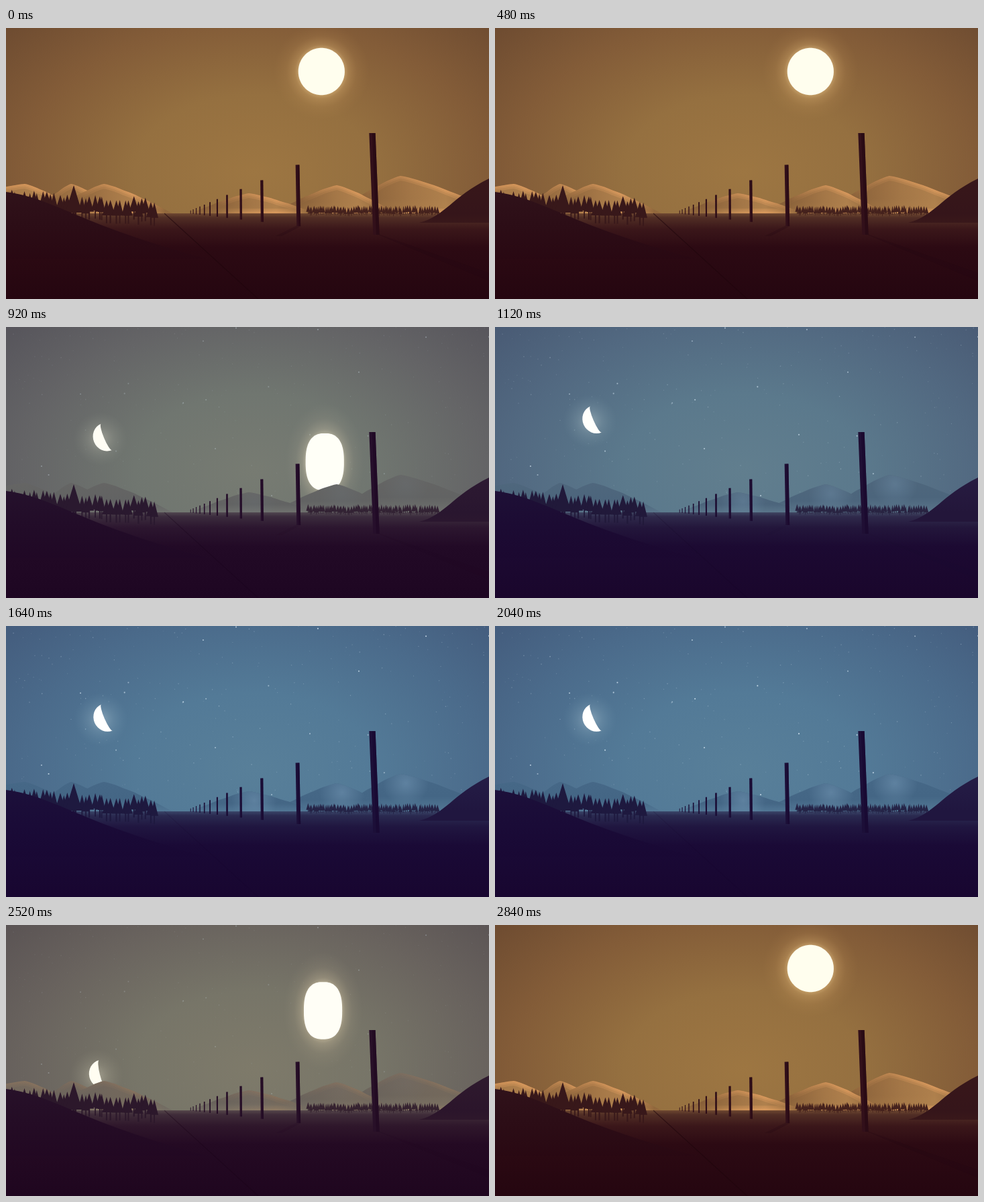
An HTML page with a canvas that plays this animation: 720x405 px, repeating every 3.24 s.

```html
<!DOCTYPE html>
<html lang="en">
<head>
<meta charset="utf-8">
<title>Day and night</title>
<style>
  html, body { margin: 0; width: 100%; height: 100%; overflow: hidden; background: #270610; }
  canvas { display: block; width: 100vw; height: 100vh; }
</style>
</head>
<body>
<canvas id="stage" width="720" height="405"></canvas>
<script>
const ctx = document.getElementById('stage').getContext('2d');
const W = 720, H = 405, HORIZON = 277, LOOP = 3240, STEP = 40, REST = 2840;

const clamp = v => Math.min(1, Math.max(0, v));
const smooth = v => { v = clamp(v); return v * v * (3 - 2 * v); };
const range = (n, make) => Array.from({ length: n }, (_, i) => make(i));

function seeded(seed) {
  return () => (seed = (seed * 16807) % 2147483647) / 2147483647;
}
const rand = seeded(4711);

// Every colour is a day/night pair blended by `night`.
let night = 0;
const channels = hex => [1, 3, 5].map(i => parseInt(hex.slice(i, i + 2), 16));
function tone(day, dark, alpha = 1) {
  const b = channels(dark);
  const rgb = channels(day).map((v, i) => Math.round(v + (b[i] - v) * night));
  return `rgba(${rgb},${alpha})`;
}
function withStops(gradient, stops) {
  for (const [at, day, dark, alpha] of stops) gradient.addColorStop(at, tone(day, dark, alpha));
  return gradient;
}
const vertical = (y0, y1, stops) => withStops(ctx.createLinearGradient(0, y0, 0, y1), stops);
const horizontal = (x0, x1, stops) => withStops(ctx.createLinearGradient(x0, 0, x1, 0), stops);
const radial = (x, y, r, stops) => withStops(ctx.createRadialGradient(x, y, 0, x, y, r), stops);

function polygon(points) {
  ctx.beginPath();
  points.forEach(([x, y]) => ctx.lineTo(x, y));
  ctx.fill();
}
function disc(x, y, r) {
  ctx.beginPath();
  ctx.arc(x, y, r, 0, 7);
  ctx.fill();
}

// Scene
const peaks = [
  { x: 588, y: 221, left: 490, right: 738 },
  { x: 493, y: 235, left: 397, right: 582 },
  { x: 362, y: 247, left: 276, right: 462 },
  { x: 28, y: 233, left: -150, right: 118 },
  { x: 97, y: 233, left: 40, right: 178 },
  { x: 146, y: 233, left: 62, right: 248 }
];
const poles = range(12, i => {
  const x = 230 + 316 / (1 + 0.545 * i), near = (x - 265) / 281;
  return { x, top: HORIZON - 120 * near, base: 276.3 + 32.7 * near, half: 0.25 + 4.4 * near, lean: 6 * near ** 2.5 };
});
const farTrees = range(66, i => {
  const top = 264.5 + rand() * 4;
  return { x: 449 + i * 2.96 + rand() * 2, top, half: 2 + rand() * 1.4, base: top + 10, trunk: 4 };
});
const nearTrees = range(34, i => {
  const x = 6 + i * 6.5 + rand() * 4, top = 240 + x * 0.058 + rand() * 9;
  return { x, top, half: 5.5 + rand() * 2.5, base: top + 23, trunk: 13 };
});
nearTrees.push({ x: 101, top: 235, half: 12.5, base: 276, trunk: 8 });

const stars = range(260, i => {
  const bright = i < 22;
  return {
    x: rand() * W, y: rand() ** 1.25 * 255, phase: rand() * 6,
    r: bright ? 1.05 : 0.45 + rand() * 0.4,
    glow: bright ? 0.8 : 0.12 + rand() * 0.28
  };
});

// Motion
const nightAt = t => smooth((t - 480) / 820) - smooth((t - 2160) / 680);

function sunAt(t) {
  const setting = t < 1600;
  const drop = setting
    ? 6 * Math.max(0, (t - 611) / 109) ** 3
    : 185 * Math.max(0, (2800 - t) / 480) ** 2;
  const squeeze = setting ? clamp((t - 600) / 240) : clamp((2760 - t) / 220);
  const stretch = setting ? squeeze : squeeze * clamp((t - 2300) / 150);
  return { x: 470.3 + drop * 0.036, y: 65 + drop, rx: 34.6 - 6 * squeeze, ry: 35.3 + 7.5 * stretch, stretch };
}
function moonDrop(t) {
  return t < 1600
    ? 88 * Math.max(0, (1175 - t) / 455) ** 2
    : 6 * Math.max(0, (t - 2180) / 140) ** 3;
}

// Drawing
function drawSky() {
  ctx.save();
  ctx.translate(370, 215);
  ctx.scale(1.55, 1);
  ctx.fillStyle = radial(0, 0, 330, [
    [0, '#9d7642', '#587f99'], [0.35, '#957040', '#537a97'],
    [0.68, '#835c38', '#4b6b8b'], [1, '#6c4a30', '#435b7c']
  ]);
  ctx.fillRect(-W, -H, 2 * W, 2 * H);
  ctx.restore();
}

function drawStars(t) {
  ctx.fillStyle = '#dcecf8';
  for (const s of stars) {
    ctx.globalAlpha = night ** 1.3 * s.glow * (0.82 + 0.18 * Math.sin(t / 130 + s.phase));
    disc(s.x, s.y, s.r);
  }
  ctx.globalAlpha = 1;
}

// A disc whose sides flatten as it is stretched
function drawSun(t) {
  const { x, y, rx, ry, stretch } = sunAt(t);
  if (y > 330) return;
  ctx.save();
  ctx.translate(x, y);
  ctx.scale(rx / 35, ry / 35);
  ctx.fillStyle = radial(0, 0, 72, [
    [0.45, '#f3cf92', '#dfe9e6', 0.6], [0.56, '#e0b474', '#c4d4d6', 0.32],
    [0.74, '#d0a062', '#a9c0c8', 0.12], [1, '#b88a50', '#8fb0c0', 0]
  ]);
  disc(0, 0, 72);
  const bend = 2 / (2 + 0.55 * stretch);
  const round = v => Math.sign(v) * Math.abs(v) ** bend * 35;
  ctx.fillStyle = tone('#fffeee', '#ffffff');
  polygon(range(120, i => [round(Math.cos(i * Math.PI / 60)), round(Math.sin(i * Math.PI / 60))]));
  ctx.restore();
}

function drawMoon(t) {
  const drop = moonDrop(t);
  if (drop > 140) return;
  const low = (drop / 88) ** 2;
  ctx.save();
  ctx.translate(150.5 - 7 * low, 136.7 + drop);
  ctx.fillStyle = radial(-9, 3, 40, [
    [0, '#ffe9b8', '#dcecef', 0.4], [0.45, '#e8c890', '#b4d0dc', 0.18], [1, '#c09a60', '#7ea6bc', 0]
  ]);
  disc(-9, 3, 40);
  ctx.rotate((10 * low - 23.5) * Math.PI / 180);
  ctx.fillStyle = tone('#fffbe6', '#ffffff');
  ctx.beginPath();
  ctx.ellipse(0, 0, 20, 21.3, 0, -Math.PI / 2, Math.PI / 2, true);
  ctx.ellipse(0, 0, 4, 21.3, 0, Math.PI / 2, Math.PI * 1.5);
  ctx.fill();
  ctx.restore();
}

function peakPath({ x, y, left, right }) {
  ctx.beginPath();
  for (let i = -24; i <= 24; i++) {
    const u = Math.abs(i) / 24, foot = i < 0 ? left : right;
    const wobble = Math.sin(i * 0.9 + x) * 1.1 * u * (1 - u);
    ctx.lineTo(x + (foot - x) * u, y + (HORIZON - y) * u ** 1.25 + wobble);
  }
  ctx.closePath();
}

function drawPeak(peak) {
  const { x, y, left, right } = peak;
  const lit = clamp(1 - 1.8 * night), silver = night ** 3;
  const light = (color, alpha) => horizontal(x - (x - left) * 0.6, x + (right - x) * 0.9, [
    [0, color, color, 0], [0.4, color, color, alpha * 0.7], [0.65, color, color, alpha], [1, color, color, 0]
  ]);
  ctx.save();
  peakPath(peak);
  ctx.fillStyle = vertical(y, HORIZON, [[0, '#8b6139', '#466887'], [0.6, '#886039', '#446685'], [1, '#93693d', '#527795']]);
  ctx.fill();
  ctx.clip();
  ctx.fillStyle = light('#c8955a', lit * 0.6);
  ctx.fill();
  ctx.strokeStyle = light('#eda564', lit * 0.3);
  for (const width of [3, 8, 14]) {
    ctx.lineWidth = width;
    ctx.stroke();
  }
  ctx.fillStyle = radial(x + 8, y + 14, 34, [[0, '#8db2cf', '#8db2cf', silver * 0.35], [1, '#8db2cf', '#8db2cf', 0]]);
  if (x > W / 2) ctx.fill();
  ctx.restore();
}

function drawGround() {
  ctx.fillStyle = vertical(HORIZON, H, [
    [0, '#6e4831', '#3a4669'], [0.05, '#512e25', '#2a2a50'], [0.18, '#3b171a', '#201640'],
    [0.4, '#2c0a13', '#1a0a36'], [1, '#250610', '#180630']
  ]);
  ctx.fillRect(0, HORIZON, W, H - HORIZON);

  const day = 1 - night;
  ctx.strokeStyle = tone('#1e050d', '#150528', 0.15 + 0.45 * day);
  ctx.lineWidth = 1.2;
  ctx.beginPath();
  ctx.moveTo(236, 277);
  ctx.lineTo(376, 405);
  ctx.stroke();

  ctx.fillStyle = tone('#230510', '#180630', 0.25 * day);
  polygon([[434, 295], [440, 296], [411, 311], [402, 311]]);
  polygon([[550, 307], [558, 309], [720, 366], [720, 378]]);
}

function drawTree({ x, top, half, base, trunk }) {
  polygon([[x, top], [x + half, base], [x - half, base]]);
  ctx.fillRect(x - half * 0.15, base - 1, Math.max(0.9, half * 0.3), trunk);
}

function drawHills() {
  ctx.fillStyle = vertical(225, 291, [[0, '#38171a', '#251d46'], [0.8, '#35151a', '#20163f'], [1, '#39181a', '#20163f']]);
  ctx.beginPath();
  ctx.moveTo(616, 291);
  ctx.bezierCurveTo(655, 281, 665, 252, W, 225);
  ctx.lineTo(W, 291);
  ctx.fill();

  ctx.fillStyle = vertical(245, 350, [[0, '#30121a', '#1c103a'], [0.5, '#2c0d16', '#1a0b37'], [1, '#290812', '#190834']]);
  ctx.beginPath();
  ctx.moveTo(0, 245);
  ctx.bezierCurveTo(75, 255, 105, 293, 300, 345);
  ctx.lineTo(0, 345);
  ctx.fill();
}

function drawPoles() {
  for (const { x, top, base, half, lean } of poles) {
    ctx.fillStyle = tone('#32101a', '#1c0f38');
    polygon([[x - half, top], [x + half, top], [x + half + lean, base], [x - half + lean, base]]);
    ctx.fillStyle = tone('#260812', '#170730', 0.55);
    polygon([[x, top], [x + half, top], [x + half + lean, base], [x + lean, base]]);
  }
}

function draw(t) {
  night = nightAt(t);
  drawSky();
  drawStars(t);
  drawSun(t);
  drawMoon(t);
  peaks.forEach(drawPeak);
  drawGround();
  ctx.fillStyle = tone('#45221d', '#252447');
  farTrees.forEach(drawTree);
  ctx.fillStyle = tone('#38181a', '#1e193f');
  nearTrees.forEach(drawTree);
  drawHills();
  drawPoles();
}

function frame() {
  const t = performance.now() % LOOP;
  draw(Math.min(REST, Math.floor(t / STEP) * STEP));
  requestAnimationFrame(frame);
}
frame();
</script>
</body>
</html>
```
